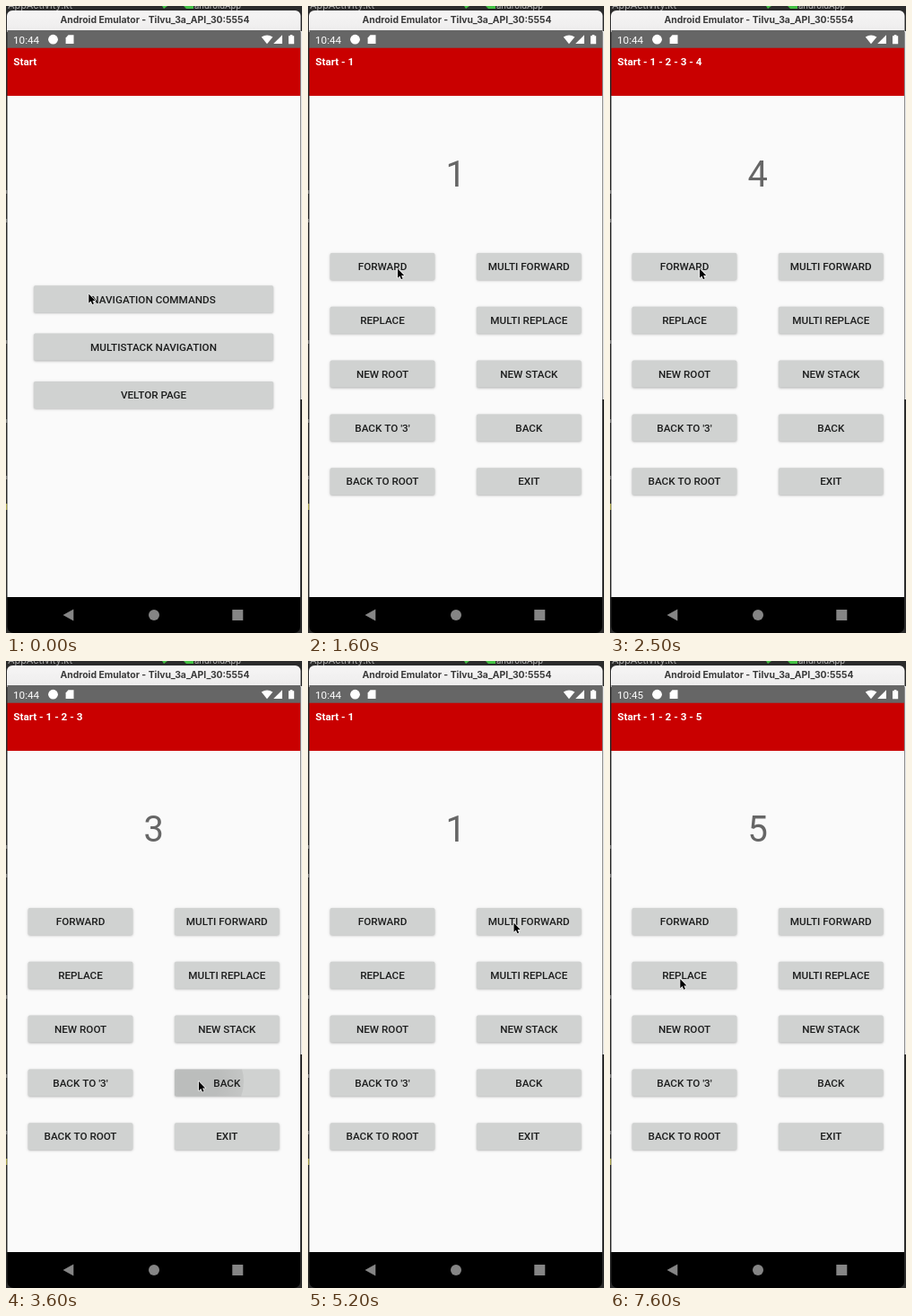
An HTML page with a canvas for the animation above (8 s loop, 330x698 px).

```html
<!DOCTYPE html>
<html lang="en">
<head>
<meta charset="utf-8">
<title>Navigation demo</title>
<style>
  html, body { margin: 0; width: 100%; height: 100%; overflow: hidden; background: #222; }
  canvas { display: block; }
</style>
</head>
<body>
<canvas id="stage" width="330" height="698"></canvas>
<script>
const ctx = document.getElementById('stage').getContext('2d');
const LOOP = 8000, STEP = 100;

const makeButton = (label, x, y, w) => ({ label, x, y, w, h: 30 });
const menuButtons = ['NAVIGATION COMMANDS', 'MULTISTACK NAVIGATION', 'VELTOR PAGE']
  .map((label, i) => makeButton(label, 31, 311.3 + i * 53.3, 267));
const gridButtons = ['FORWARD', 'MULTI FORWARD', 'REPLACE', 'MULTI REPLACE', 'NEW ROOT',
  'NEW STACK', "BACK TO '3'", 'BACK', 'BACK TO ROOT', 'EXIT']
  .map((label, i) => makeButton(label, i % 2 ? 188 : 24.7, 275 + (i >> 1) * 59.8, 116.6));
const [forward, multiForward, replace, , , , , back] = gridButtons;

// Each click opens a stack of numbered screens shortly after the press.
const CLICK_DELAY = 150;
const clicks = [
  { time: 50, button: menuButtons[0], stack: [1] },
  { time: 1650, button: forward, stack: [1, 2] },
  { time: 1850, button: forward, stack: [1, 2, 3] },
  { time: 2250, button: forward, stack: [1, 2, 3, 4] },
  { time: 3250, button: back, stack: [1, 2, 3] },
  { time: 3550, button: back, stack: [1, 2] },
  { time: 4050, button: back, stack: [1] },
  { time: 5250, button: multiForward, stack: [1, 2, 3, 4] },
  { time: 7150, button: replace, stack: [1, 2, 3, 5] }
];

const cursorPath = [ // time, x, y
  [0, 92.3, 320.5], [900, 92.3, 320.5], [1500, 100, 292.5], [2500, 100, 292.5],
  [3100, 215, 468], [4300, 215, 468], [4900, 229.5, 291.5], [6000, 229.5, 291.5],
  [6700, 87, 450.5], [7000, 78.3, 354], [LOOP, 78.3, 354]
];

function cursorAt(t) {
  const i = cursorPath.findIndex(key => key[0] > t);
  const [t0, x0, y0] = cursorPath[i - 1], [t1, x1, y1] = cursorPath[i];
  const p = (t - t0) / (t1 - t0), ease = p * p * (3 - 2 * p);
  return [x0 + (x1 - x0) * ease, y0 + (y1 - y0) * ease];
}

function rect(x, y, w, h, color) {
  ctx.fillStyle = color;
  ctx.fillRect(x, y, w, h);
}

function circle(x, y, r, color) {
  ctx.fillStyle = color;
  ctx.beginPath();
  ctx.arc(x, y, r, 0, Math.PI * 2);
  ctx.fill();
}

function shape(path, color, x = 0, y = 0) {
  ctx.save();
  ctx.translate(x, y);
  ctx.fillStyle = color;
  ctx.fill(new Path2D(path));
  ctx.restore();
}

function text(value, x, y, font, color, align = 'left') {
  ctx.font = font;
  ctx.fillStyle = color;
  ctx.textAlign = align;
  ctx.fillText(value, x, y);
}

function drawRipple(b, x, y, age) {
  const fill = ctx.createRadialGradient(x, y, 0, x, y, age);
  const strength = age < 100 ? 1 : 0.5;
  fill.addColorStop(0.45, `rgba(0,0,0,${0.1 * strength})`);
  fill.addColorStop(1, `rgba(0,0,0,${0.06 * strength})`);
  ctx.save();
  ctx.beginPath();
  ctx.roundRect(b.x, b.y, b.w, b.h, 1.7);
  ctx.clip();
  circle(x, y, age, fill);
  ctx.restore();
}

function drawButton(b, t) {
  ctx.save();
  ctx.shadowColor = 'rgba(0,0,0,.28)';
  ctx.shadowBlur = 2.5;
  ctx.shadowOffsetY = 0.8;
  ctx.fillStyle = '#d0d2d1';
  ctx.beginPath();
  ctx.roundRect(b.x, b.y, b.w, b.h, 1.7);
  ctx.fill();
  ctx.restore();

  const click = clicks.find(c => c.button === b && t >= c.time && t < c.time + 200);
  if (click) drawRipple(b, ...cursorAt(t), t - click.time);
  text(b.label, b.x + b.w / 2, b.y + 19.2, '500 11.7px Roboto, sans-serif', '#1c1d1d', 'center');
}

function drawDesktop() {
  rect(0, 0, 330, 698, '#2b2b2b');
  text('AppActivity.kt', 2, 2.5, '11px Inter, sans-serif', '#aaa');
  text('androidApp', 210, 2.5, '9.5px Inter, sans-serif', '#bbb');
  shape('M174 0h6l-4 3zM198 0h11v3h-8z', '#43c243');
  rect(328, 28, 2, 410, '#eee');
  rect(328, 28, 1, 410, '#8a8a8a');
  for (const y of [205, 237, 372, 460, 523]) rect(0, y, 1.3, 4, '#777');
  rect(0, 554, 1.5, 7, '#a9a34d');
}

function drawFrame(t) {
  const titleFill = ctx.createLinearGradient(0, 5, 0, 27);
  titleFill.addColorStop(0, '#f6f5f5');
  titleFill.addColorStop(1, '#eeeded');
  ctx.fillStyle = titleFill;
  ctx.beginPath();
  ctx.roundRect(1, 5, 327.5, 24, [6, 6, 0, 0]);
  ctx.fill();
  text('Android Emulator - Tilvu_3a_API_30:5554', 166, 19.2,
    '700 10.4px Inter, sans-serif', '#3a3a3a', 'center');

  rect(1.5, 27, 326.5, 20, '#666');
  text(t < 6900 ? '10:44' : '10:45', 8, 41.7, '11.7px Roboto, sans-serif', '#fff');
  circle(52.5, 37.2, 5.4, '#fff');
  shape('M69.5 32.3h6v9.8h-8.9v-6.6z', '#fff');
  shape('M284.8 34.5Q291 30.5 297.4 34.5L291 42.2z', '#fff');
  shape('M308 32.3v9.8h-9.8z', '#fff');
  shape('M315 33.3h1.8v-1.2h2.6v1.2h1.8v9h-6.2z', '#fff');

  rect(1.5, 100, 326.5, 558, '#fafafa');
  rect(1.5, 46.7, 326.5, 53.3, '#c90000');

  ctx.fillStyle = '#000';
  ctx.beginPath();
  ctx.roundRect(1.5, 658, 326.5, 40, [0, 0, 7, 7]);
  ctx.fill();
  shape('M63.5 678L75.3 671.6v12.8z', '#858585');
  circle(165, 678, 6, '#858585');
  rect(252.3, 672, 12, 12, '#858585');
}

function drawScreen(stack, t) {
  text(['Start', ...stack].join(' - '), 8.3, 66.3, '700 11.7px Roboto, sans-serif', '#fff');
  if (stack.length) {
    text(stack.at(-1), 164.8, 200.8, '39.8px Roboto, sans-serif', '#666', 'center');
  }
  (stack.length ? gridButtons : menuButtons).forEach(b => drawButton(b, t));
}

function drawCursor(t) {
  const arrow = 'M0 0V10.2L2.3 8L4 11.8L5.6 11L4.1 7.4H7.2z';
  ctx.save();
  ctx.translate(...cursorAt(t));
  ctx.lineWidth = 1.2;
  ctx.lineJoin = 'round';
  ctx.strokeStyle = '#fff';
  ctx.stroke(new Path2D(arrow));
  ctx.restore();
  shape(arrow, '#000', ...cursorAt(t));
}

function draw(t) {
  drawDesktop();
  drawFrame(t);
  const current = clicks.findLast(c => t >= c.time + CLICK_DELAY);
  const stack = current ? current.stack : [];
  // The first screen change dissolves; later ones cut.
  const fade = Math.min(1, Math.max(0, (t - 200) / 300));
  if (fade < 1) {
    ctx.globalAlpha = 1 - fade;
    drawScreen([], t);
  }
  ctx.globalAlpha = fade;
  if (fade > 0) drawScreen(stack, t);
  ctx.globalAlpha = 1;
  drawCursor(t);
}

const start = performance.now();
function tick() {
  const t = (performance.now() - start) % LOOP;
  draw(Math.floor(t / STEP) * STEP);
  requestAnimationFrame(tick);
}
tick();
</script>
</body>
</html>
```
